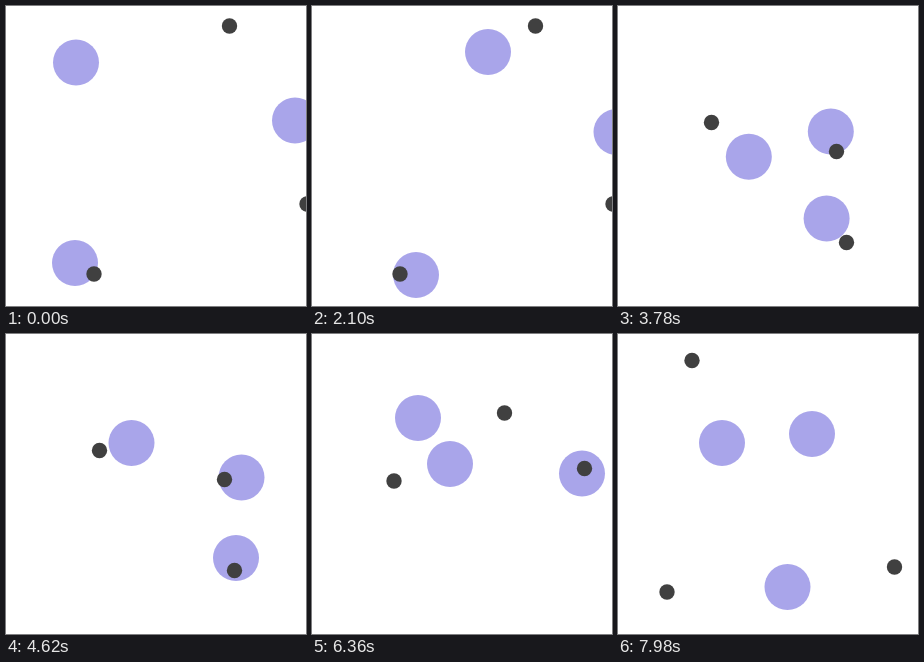
Animation of 300 by 300 pixels, one loop 8000 ms. Source, as an HTML page with a canvas:

```html
<!DOCTYPE html>
<html lang="en">
<head>
<meta charset="utf-8">
<title>Agents seeking landmarks</title>
<style>
  html, body { margin: 0; height: 100%; overflow: hidden; background: #fff; }
  canvas { display: block; width: 100vmin; height: 100vmin; }
</style>
</head>
<body>
<canvas id="stage" width="300" height="300"></canvas>
<script>
const ctx = document.getElementById('stage').getContext('2d');
const LOOP = 8000;
const EPISODE_STEPS = 27;
const STEP = 2520 / EPISODE_STEPS;

// Agents pass their key points at the shared beats (in steps), starting from
// rest, and settle on the landmark of the same index as the episode ends.
const episodes = [
  {
    landmarks: [[223.5, 20], [301, 198], [88, 268]],
    beats: [0, 10, 22],
    agents: [
      [[70, 56.5], [270, 65], [176, 46]],
      [[289, 114.5], [288.5, 205], [304.5, 126]],
      [[69, 257], [109, 231], [104, 269]]
    ]
  },
  {
    landmarks: [[218.5, 145.5], [93.5, 116.5], [228.5, 236.5]],
    beats: [0, 5, 10, 22],
    agents: [
      [[193, 8], [191.5, 63], [204, 114], [235.5, 143.5]],
      [[46, 212], [140, 207], [132, 168], [125.5, 109]],
      [[184, 273], [181, 194.5], [200, 208], [230, 224]]
    ]
  },
  {
    landmarks: [[192.5, 79], [82, 147], [272.5, 134.5]],
    beats: [0, 14],
    agents: [
      [[15, 110], [106, 84]],
      [[180, 31], [138, 130]],
      [[170, 269], [270, 139.5]]
    ]
  },
  {
    landmarks: [[74, 26.5], [276.5, 233], [49, 258]],
    beats: [0, 4],
    agents: [
      [[138, 113], [104, 109]],
      [[217, 58], [194, 100]],
      [[165, 208], [169.5, 253]]
    ]
  }
];

// Smooth curve through values at given times, at rest at both ends.
function follow(times, values, t) {
  const last = times.length - 1;
  const slope = k => k === 0 || k === last ? 0 :
    (values[k + 1] - values[k - 1]) / (times[k + 1] - times[k - 1]);
  const i = times.findLastIndex((time, k) => k < last && time <= t);
  const span = times[i + 1] - times[i];
  const u = (t - times[i]) / span;
  const ease = u * u * (3 - 2 * u);
  const bend = (1 - u) * slope(i) - u * slope(i + 1);
  return values[i] + (values[i + 1] - values[i]) * ease + span * u * (1 - u) * bend;
}

function disc(x, y, radius, color) {
  ctx.fillStyle = color;
  ctx.beginPath();
  ctx.arc(x, y, radius, 0, Math.PI * 2);
  ctx.fill();
}

function draw(time) {
  const step = Math.floor((time % LOOP) / STEP + 1e-6);
  const { landmarks, beats, agents } = episodes[Math.floor(step / EPISODE_STEPS)];
  const times = [...beats, EPISODE_STEPS];
  ctx.clearRect(0, 0, 300, 300);
  agents.forEach((points, i) => {
    const path = [...points, landmarks[i]];
    const [x, y] = [0, 1].map(axis =>
      follow(times, path.map(point => point[axis]), step % EPISODE_STEPS));
    disc(x, y, 23, 'rgba(84, 77, 214, 0.5)');
  });
  for (const [x, y] of landmarks) disc(x, y, 7.7, '#404040');
}

let start;
function tick(now) {
  start ??= now;
  draw(now - start);
  requestAnimationFrame(tick);
}
draw(0);
requestAnimationFrame(tick);
</script>
</body>
</html>
```
